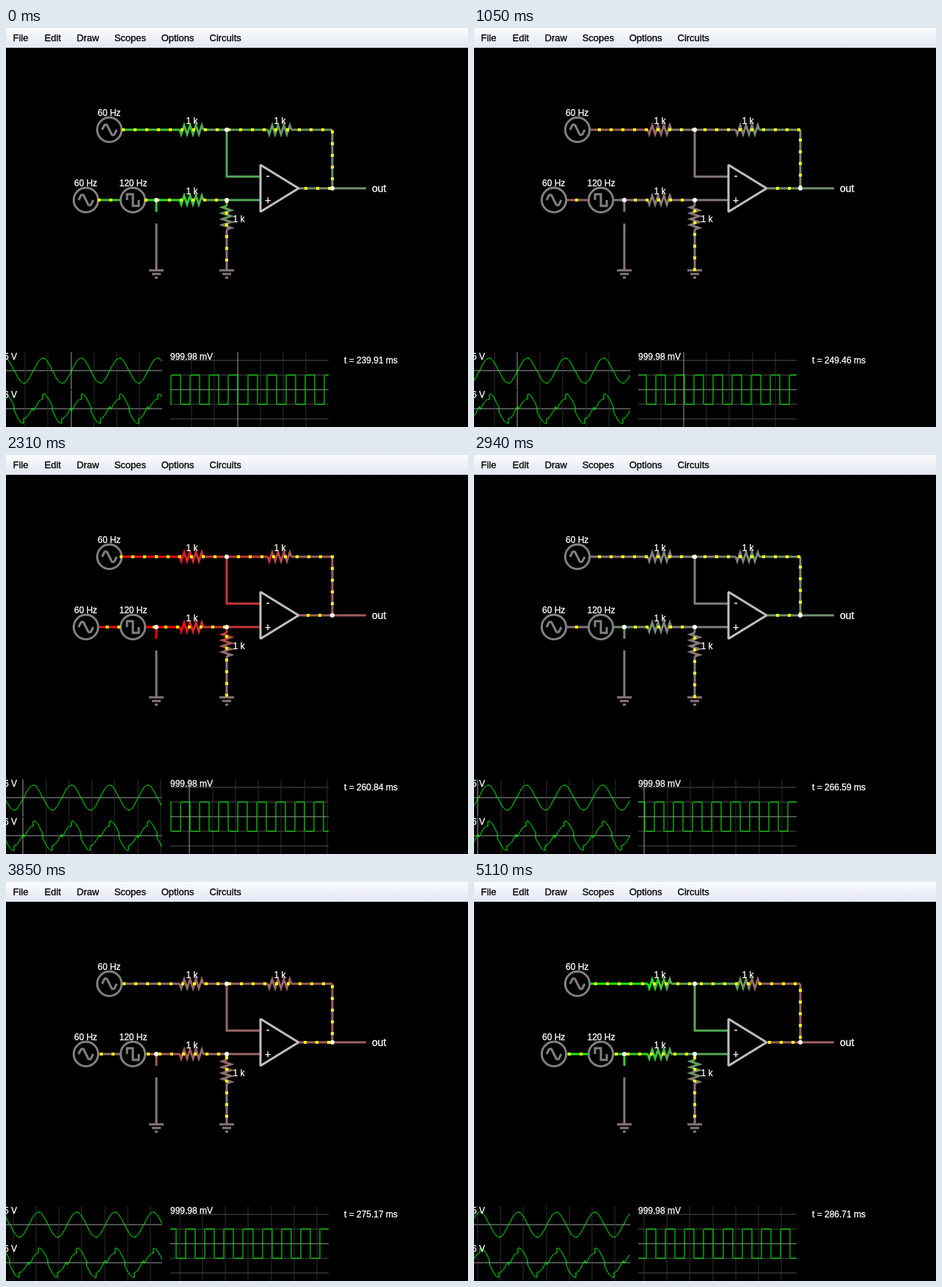
An HTML page with a canvas for the animation above (5180 ms loop, 630 by 545 pixels).

```html
<!DOCTYPE html>
<html lang="en">
<head>
<meta charset="utf-8">
<title>Difference amplifier</title>
<style>
  html, body { margin: 0; width: 100%; height: 100%; overflow: hidden; background: #000; }
  #stage { position: absolute; left: 0; top: 0; width: 630px; height: 545px; overflow: hidden; }
  canvas, svg { position: absolute; left: 0; top: 0; }
  nav { position: absolute; left: 0; top: 0; width: 630px; height: 27px; background: linear-gradient(#fcfcfe, #e1e6f1); }
  text { font: 12px "Liberation Sans", Arial, sans-serif; fill: #fff; stroke: #fff; stroke-width: .3; white-space: pre; }
  .menu text { font-size: 13px; fill: #000; stroke: #000; }
  .big { font-size: 14px; }
</style>
</head>
<body>
<div id="stage">
  <nav></nav>
  <canvas id="view" width="630" height="545"></canvas>
  <svg width="630" height="545" viewBox="0 0 630 545">
    <g class="menu">
      <text x="9.5" y="18">File</text><text x="52.5" y="18">Edit</text>
      <text x="96.5" y="18">Draw</text><text x="147.7" y="18">Scopes</text>
      <text x="211.7" y="18">Options</text><text x="277.5" y="18">Circuits</text>
    </g>
    <path d="M347 187V251L399 219Z" fill="none" stroke="#c0c0c0" stroke-width="3" stroke-linejoin="bevel"/>
    <g fill="#fff">
      <circle cx="301" cy="139" r="3"/><circle cx="205" cy="235" r="3"/>
      <circle cx="301" cy="235" r="3"/><circle cx="445" cy="219" r="3"/>
    </g>
    <text x="125" y="120">60 Hz</text>
    <text x="93" y="216">60 Hz</text>
    <text x="154.5" y="216">120 Hz</text>
    <text x="245.5" y="131">1 k</text>
    <text x="365.5" y="131">1 k</text>
    <text x="245.5" y="227">1 k</text>
    <text x="309.5" y="265">1 k</text>
    <g text-anchor="middle">
      <text class="big" x="357" y="207">-</text>
      <text class="big" x="357" y="240">+</text>
    </g>
    <text class="big" x="499" y="224">out</text>
    <text x="-3" y="453">5 V</text>
    <text x="-3" y="505">6 V</text>
    <text x="224" y="453">999.98 mV</text>
    <text id="clock" x="461" y="458"></text>
  </svg>
</div>
<script>
const ctx = document.getElementById('view').getContext('2d');
const clock = document.getElementById('clock');
const LOOP = 5180, STEP = 70, TAU = 2 * Math.PI;
const MS_PER_PX = 0.32;

// wall clock (ms) -> simulated time (ms)
const timeline = [[0, 239.91], [1050, 249.46], [1750, 255.73], [2940, 266.59],
                  [3850, 275.17], [4620, 282.1], [5110, 286.71]];

const simTime = ms => {
  const i = Math.max(1, timeline.findIndex(k => k[0] >= ms));
  const [a, ta] = timeline[i - 1], [b, tb] = timeline[i];
  return ta + (tb - ta) * (ms - a) / (b - a);
};

const cycles = t => t * 0.06;
const sine = t => 5 * Math.sin(TAU * cycles(t));
const square = t => (cycles(t) * 2) % 1 >= 0.5 ? 1 : -1;
const sum = t => sine(t) + square(t);

// charge moved since the cycle began; sign sets the square wave's share
const charge = (t, sign) => {
  const p = cycles(t) + 0.015;
  const triangle = 0.25 - Math.abs((p * 2) % 1 - 0.5) / 2;
  return 13.8 * (5 / TAU * (1 - Math.cos(TAU * p)) + sign * triangle);
};

function voltColor(volts) {
  const level = Math.min(31, Math.max(0, Math.floor((volts + 5) * 3.1))) / 16 - 1;
  const hi = Math.floor(128 * Math.abs(level)) + 127;
  const lo = Math.floor(127 * (1 - Math.abs(level)));
  return level < 0 ? `rgb(${hi},${lo},${lo})` : `rgb(${lo},${hi},${lo})`;
}

function line(color, width, ...pts) {
  ctx.strokeStyle = color;
  ctx.lineWidth = width;
  ctx.beginPath();
  for (let i = 0; i < pts.length; i += 2) ctx.lineTo(pts[i], pts[i + 1]);
  ctx.stroke();
}

const wire = (volts, ...pts) => line(voltColor(volts), 3, ...pts);

function resistor(x, y, v1, v2, angle = 0) {
  const shade = ctx.createLinearGradient(0, 0, 32, 0);
  shade.addColorStop(0, voltColor(v1));
  shade.addColorStop(1, voltColor(v2));
  const pts = [0, 0];
  for (let i = 0; i < 8; i++) pts.push(2 + 4 * i, i % 2 ? -6 : 6);
  ctx.save();
  ctx.translate(x, y);
  ctx.rotate(angle);
  line(shade, 3, ...pts, 32, 0);
  ctx.restore();
}

function ground(x, y) {
  for (let i = 0; i < 3; i++) wire(0, x - 10 + 4 * i, y + 5 * i, x + 10 - 4 * i, y + 5 * i);
}

const sineIcon = Array.from({ length: 21 }, (_, i) =>
  [i - 10, Math.trunc(7.6 * Math.sin((i - 10) * Math.PI / 10))]).flat();
const squareIcon = [-8, 0, -8, -8, 0, -8, 0, 8, 8, 8, 8, 0];

function source(x, y, icon) {
  ctx.save();
  ctx.translate(x, y);
  line('#808080', 3, ...icon);
  ctx.beginPath();
  ctx.arc(0, 0, 16.66, 0, TAU);
  ctx.stroke();
  ctx.restore();
}

function dots(x0, y0, x1, y1, shift) {
  const length = Math.hypot(x1 - x0, y1 - y0);
  ctx.fillStyle = '#ff0';
  for (let d = (shift % 16 + 16) % 16; d < length; d += 16) {
    const f = d / length;
    ctx.fillRect(Math.floor(x0 + (x1 - x0) * f) - 2, Math.floor(y0 + (y1 - y0) * f) - 2, 4, 4);
  }
}

function drawCircuit(t) {
  const v1 = sine(t), v2 = sum(t), mid = v2 / 2, out = square(t);
  wire(v1, 157, 139, 237, 139);
  resistor(237, 139, v1, mid);
  wire(mid, 269, 139, 357, 139);
  resistor(357, 139, mid, out);
  wire(out, 389, 139, 445, 139);
  wire(out, 445, 139, 445, 219);
  wire(out, 399, 219, 491, 219);
  wire(mid, 301, 139, 301, 203, 347, 203);

  wire(v1, 125, 235, 156, 235);
  wire(v2, 189, 235, 237, 235);
  wire(v2, 205, 235, 205, 251);
  resistor(237, 235, v2, mid);
  wire(mid, 269, 235, 347, 235);
  wire(mid, 301, 235, 301, 243);
  resistor(301, 243, mid, 0, Math.PI / 2);
  wire(0, 301, 275, 301, 331);
  wire(0, 205, 267, 205, 331);
  ground(205, 331);
  ground(301, 331);

  source(141, 139, sineIcon);
  source(109, 235, sineIcon);
  source(173, 235, squareIcon);

  const top = 14 + charge(t, 1), bottom = 15.7 + charge(t, -1);
  dots(157, 139, 445, 139, top);
  dots(445, 139, 445, 219, top);
  dots(445, 219, 399, 219, top);
  dots(125, 235, 156, 235, bottom);
  dots(189, 235, 301, 235, bottom);
  dots(301, 235, 301, 331, bottom);
}

function scope(t, wave, s) {
  ctx.save();
  ctx.beginPath();
  ctx.rect(s.left, s.top, s.right - s.left, s.bottom - s.top);
  ctx.clip();
  for (const y of s.rules || []) line('#505050', 1, s.left, s.mid + y, s.right, s.mid + y);
  line('#a0a0a0', 1, s.left, s.mid, s.right, s.mid);
  for (let g = Math.floor(t / 10) * 10; ; g -= 10) {
    const x = Math.round(s.right + 0.4 - (t - g) / MS_PER_PX);
    if (x < s.left) break;
    line(g % 100 ? '#303030' : '#a0a0a0', 1, x, s.top, x, s.bottom);
  }
  const level = x => s.mid - Math.trunc(s.scale * wave(t - (s.right + 0.7 - x) * MS_PER_PX));
  for (let x = s.left; x < s.right; x++) {
    const a = level(x - 1), b = level(x);
    line('#0f0', 1, x, a, a === b ? x + 1 : x, b);
  }
  ctx.restore();
}

const left = { left: 0, right: 213, scale: 3.5 };
const sineScope = { ...left, top: 443, bottom: 494, mid: 468 };
const sumScope = { ...left, top: 495, bottom: 545, mid: 520 };
const outScope = { left: 224, right: 440, top: 443, bottom: 545, mid: 494, scale: 20, rules: [-40, -20, 20, 40] };

function draw(t) {
  ctx.fillStyle = '#000';
  ctx.fillRect(0, 27, 630, 518);
  drawCircuit(t);
  scope(t, sine, sineScope);
  scope(t, sum, sumScope);
  scope(t, square, outScope);
  clock.textContent = `t = ${+t.toFixed(2)} ms`;
}

const start = performance.now();
let shown = -1;
function tick() {
  const step = Math.floor((performance.now() - start) % LOOP / STEP);
  if (step !== shown) draw(simTime((shown = step) * STEP));
  requestAnimationFrame(tick);
}
tick();
</script>
</body>
</html>
```
